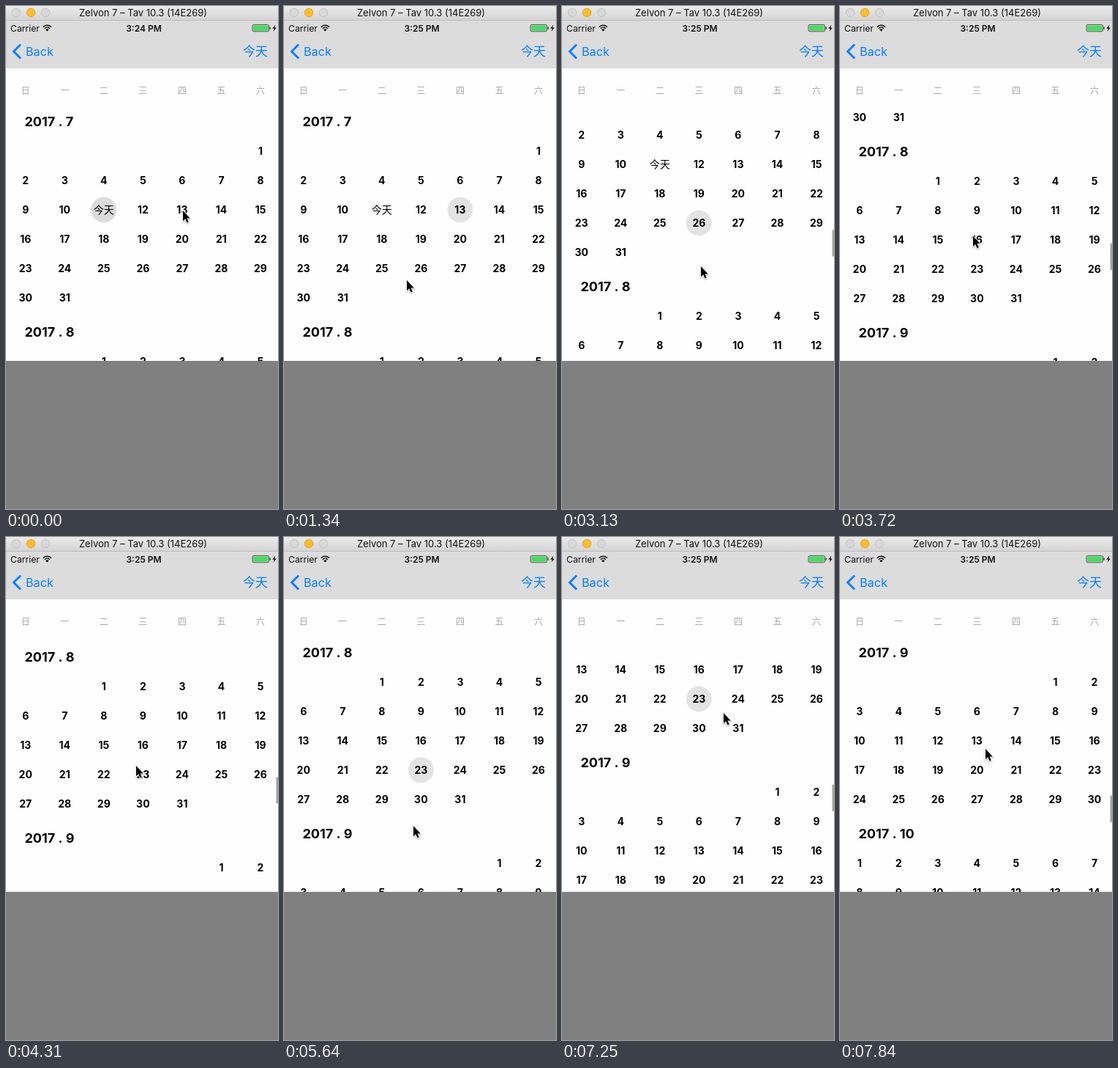
Write an HTML page with a canvas that moves like this. It is 372 by 686 pixels and loops after 7990 ms.

```html
<!DOCTYPE html>
<html lang="zh">
<head>
<meta charset="utf-8">
<title>Calendar</title>
<style>
html, body { margin: 0; width: 100%; height: 100%; overflow: hidden; background: #808080; }
canvas { display: block; }
</style>
</head>
<body>
<canvas id="stage" width="372" height="686"></canvas>
<script>
const ctx = document.getElementById('stage').getContext('2d');
const LOOP = 7990, STEP = 148;
const LATIN = 'Inter, Roboto, sans-serif';
const CJK = '"Noto Sans CJK SC", "Noto Sans CJK", sans-serif';
const BLUE = '#087dff';

// Keys are [step, value...]; values between keys are linear.
const CURSOR = [
  [0, 242, 279], [1, 232, 292], [7, 232, 292], [9, 168, 374], [11, 168, 374],
  [13, 186, 357], [14, 186, 357], [17, 190, 413], [18, 190, 413], [19, 190, 408],
  [20, 190, 391], [21, 190, 355], [22, 185, 315], [29, 178, 312], [34, 179, 316],
  [36, 179, 318], [38, 177, 394], [41, 178, 443], [42, 178, 443], [46, 208, 337],
  [47, 212, 324], [48, 217, 287], [49, 221, 240], [50, 219, 236], [53, 199, 289]
];
const SCROLL = [[18, 0], [19, 5], [20, 24], [21, 62], [22, 120], [23, 182]];
const SCROLL2 = [[46, 287], [47, 300], [48, 337], [49, 384], [50, 450], [51, 502], [52, 528], [53, 534]];

function at(keys, k) {
  const i = keys.findIndex(key => key[0] >= k);
  if (i <= 0) return keys[i < 0 ? keys.length - 1 : 0].slice(1);
  const a = keys[i - 1], b = keys[i], p = (k - a[0]) / (b[0] - a[0]);
  return a.slice(1).map((v, n) => v + (b[n + 1] - v) * p);
}

function scrollAt(k) {
  if (k <= 22) return at(SCROLL, k)[0];
  if (k <= 34) return Math.round(287 - 6 * Math.exp((29 - k) * STEP / 310));
  return at(SCROLL2, k)[0];
}

function selectedAt(k) {
  return k < 4 ? '7/11' : k < 14 ? '7/13' : k < 36 ? '7/26' : '8/23';
}

function text(s, x, y, font, color = '#000', align = 'center') {
  ctx.font = font;
  ctx.fillStyle = color;
  ctx.textAlign = align;
  ctx.fillText(s, x, y);
}

function rect(x, y, w, h, color) {
  ctx.fillStyle = color;
  ctx.fillRect(x, y, w, h);
}

function pill(x, y, w, h, r, color) {
  ctx.fillStyle = color;
  ctx.beginPath();
  ctx.roundRect(x, y, w, h, r);
  ctx.fill();
}

function disc(x, y, r, color, edge) {
  ctx.beginPath();
  ctx.arc(x, y, r, 0, 7);
  ctx.fillStyle = color;
  ctx.fill();
  if (edge) {
    ctx.strokeStyle = edge;
    ctx.lineWidth = 1;
    ctx.stroke();
  }
}

const column = i => 26.7 + 53.55 * i;

function drawTitleBar() {
  const g = ctx.createLinearGradient(0, 0, 0, 19);
  g.addColorStop(0, '#ebebeb');
  g.addColorStop(1, '#d4d4d4');
  rect(0, 0, 372, 20, g);
  rect(0, 19, 372, 1, '#bdbdbd');
  disc(14, 9, 5.7, '#d9d9d9', '#c2c2c2');
  disc(34, 9, 5.7, '#fdbd30', '#e3a325');
  disc(54, 9, 5.7, '#d9d9d9', '#c2c2c2');
  text('Zelvon 7 – Tav 10.3 (14E269)', 187.5, 14, '13px ' + LATIN, '#111');
}

function drawStatus(k) {
  rect(0, 20, 372, 65, '#dcdcdc');
  text('Carrier', 6, 34.5, '12.2px ' + LATIN, '#111', 'left');
  ctx.strokeStyle = '#111';
  ctx.lineWidth = 1.6;
  for (const r of [4.7, 7.7]) {
    ctx.beginPath();
    ctx.arc(56.3, 34, r, -Math.PI * 0.76, -Math.PI * 0.24);
    ctx.stroke();
  }
  ctx.beginPath();
  ctx.moveTo(56.3, 34.5);
  ctx.arc(56.3, 34.5, 3, -Math.PI * 0.76, -Math.PI * 0.24);
  ctx.fillStyle = '#111';
  ctx.fill();
  text(k < 5 ? '3:24 PM' : '3:25 PM', 188.5, 34.5, '600 12px ' + LATIN, '#111');

  ctx.strokeStyle = '#333';
  ctx.lineWidth = 0.8;
  ctx.beginPath();
  ctx.roundRect(337, 25.4, 22.6, 9.4, 2);
  ctx.stroke();
  pill(338, 26.4, 20.6, 7.4, 1, '#4cd964');
  pill(360.4, 28.3, 1.4, 3.6, 0.7, '#333');
  ctx.fillStyle = '#111';
  ctx.fill(new Path2D('M368.4 25.5L364.4 30.7H366.8L365.7 34.8L369.8 29.4H367.3Z'));

  ctx.strokeStyle = BLUE;
  ctx.lineWidth = 2.9;
  ctx.stroke(new Path2D('M20 52.5L10.5 62L20 71.5'));
  text('Back', 27, 68, '16.2px ' + LATIN, BLUE, 'left');
  text('今天', 341, 68.3, '17px ' + CJK, BLUE);
}

function drawMonths(k, scroll) {
  const selected = selectedAt(k);
  let top = 157 - scroll;
  ctx.save();
  ctx.beginPath();
  ctx.rect(0, 146, 372, 338);
  ctx.clip();
  for (let month = 7; month <= 10; month++) {
    const first = new Date(2017, month - 1, 1).getDay();
    const days = new Date(2017, month, 0).getDate();
    text('2017 . ' + month, 25.5, top + 6.5, 'bold 18px ' + LATIN, '#000', 'left');
    for (let d = 1; d <= days; d++) {
      const cell = first + d - 1, id = month + '/' + d;
      const x = column(cell % 7), y = top + 41 + 40 * Math.floor(cell / 7);
      if (y < 120 || y > 510) continue;
      if (id === selected) disc(x, y, 17.4, k < 4 ? '#dcdcdc' : '#e3e3e3');
      if (id === '7/11') text('今天', x, y + 5.2, '500 14px ' + CJK);
      else text(d, x, y + 5, 'bold 14px ' + LATIN);
    }
    top += 47 + 40 * Math.ceil((first + days) / 7);
  }
  ctx.restore();
}

function drawScrollbar(k, scroll) {
  const shown = k >= 19 && k <= 32 || k >= 47;
  if (!shown && k !== 33) return;
  ctx.globalAlpha = shown ? 1 : 0.4;
  pill(369.5, 299 + scroll / 10, 2.5, 36.5, 1.2, '#a3a3a3');
  ctx.globalAlpha = 1;
}

function drawCursor(k) {
  const [x, y] = at(CURSOR, k);
  const arrow = new Path2D('M0 0V14.2L3.2 11.2L5.5 16.6L7.8 15.6L5.5 10.4H9.8Z');
  ctx.save();
  ctx.translate(x, y);
  ctx.shadowColor = 'rgba(0,0,0,.35)';
  ctx.shadowBlur = 2;
  ctx.shadowOffsetY = 1;
  ctx.strokeStyle = '#fff';
  ctx.lineWidth = 1.8;
  ctx.stroke(arrow);
  ctx.shadowColor = 'transparent';
  ctx.fillStyle = '#000';
  ctx.fill(arrow);
  ctx.restore();
}

function draw(now) {
  const k = Math.min(53, Math.floor((now % LOOP + 20) / STEP));
  const scroll = scrollAt(k);
  rect(0, 85, 372, 399, '#fefefe');
  rect(0, 484, 372, 202, '#808080');
  drawTitleBar();
  drawStatus(k);
  [...'日一二三四五六'].forEach((s, i) => text(s, column(i), 119.5, '12px ' + CJK, '#a6a6a6'));
  drawMonths(k, scroll);
  drawScrollbar(k, scroll);
  drawCursor(k);
}

const start = performance.now();
function tick() {
  draw(performance.now() - start);
  requestAnimationFrame(tick);
}
tick();
</script>
</body>
</html>
```
